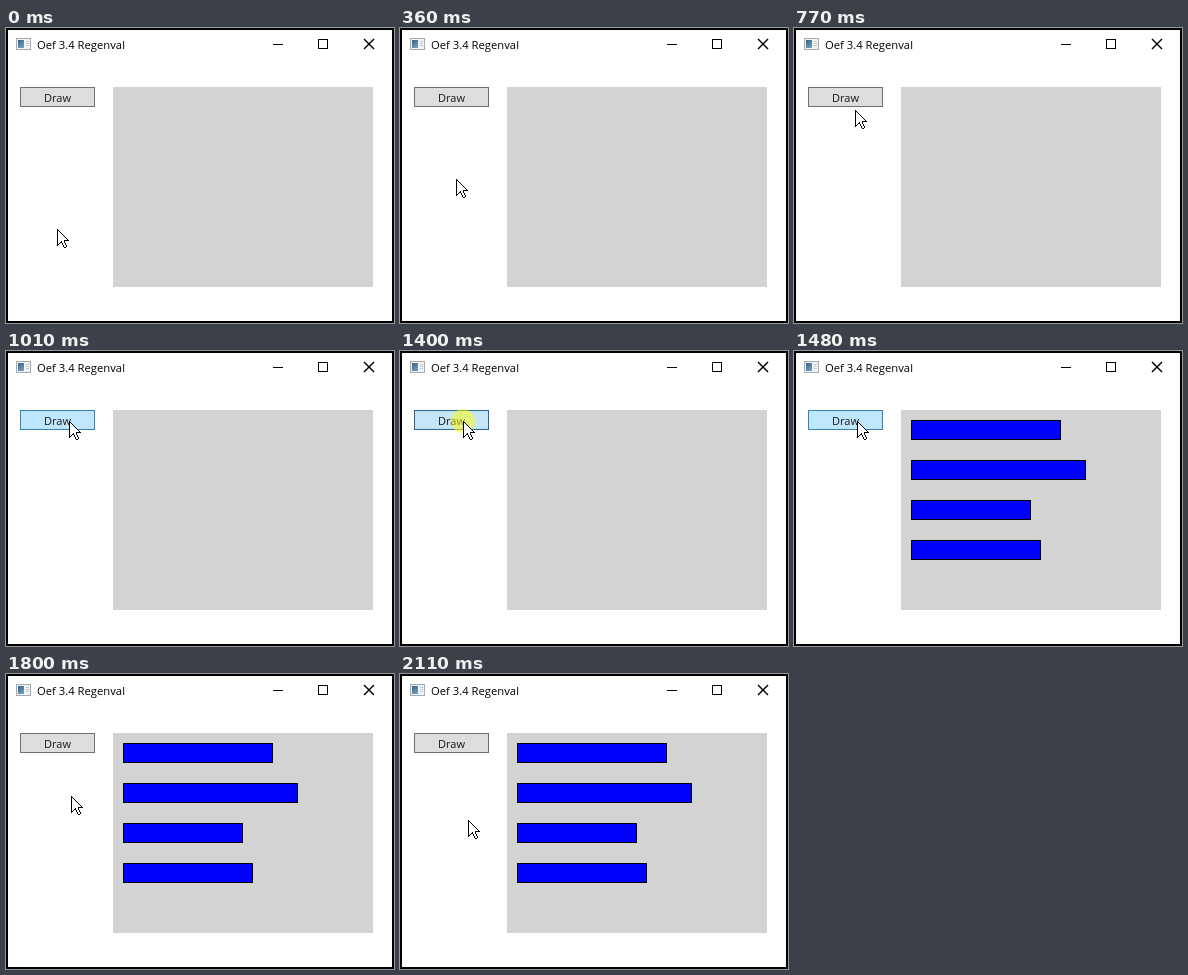
Write an HTML page with a canvas that moves like this. It is 388 px wide and 295 px high and loops after 3.71 s.

```html
<!DOCTYPE html>
<html lang="nl">
<head>
<meta charset="utf-8">
<title>Regenval</title>
<style>
html, body { margin: 0; width: 100%; height: 100%; overflow: hidden; background: #fff; }
canvas { display: block; }
</style>
</head>
<body>
<canvas id="stage" width="388" height="295"></canvas>
<script>
const ctx = document.getElementById('stage').getContext('2d');
const LOOP = 3710, PRESS = 1400, RELEASE = 1480, LEAVE = 1645;
const FONT = '"Open Sans", "Noto Sans", sans-serif';
const BARS = [150, 175, 120, 130];

function rect(x, y, w, h, fill) {
  ctx.fillStyle = fill;
  ctx.fillRect(x, y, w, h);
}

function box(x, y, w, h, fill, border, edge = 1) {
  rect(x, y, w, h, border);
  rect(x + edge, y + edge, w - 2 * edge, h - 2 * edge, fill);
}

function text(str, x, y, size, color) {
  ctx.font = `${size}px ${FONT}`;
  ctx.fillStyle = color;
  ctx.fillText(str, x, y);
}

function line(x1, y1, x2, y2) {
  ctx.beginPath();
  ctx.moveTo(x1, y1);
  ctx.lineTo(x2, y2);
  ctx.stroke();
}

function drawIcon() {
  box(10, 10, 15, 12, '#f1f4f6', '#a3abb1');
  const blue = ctx.createLinearGradient(12, 12, 18, 20);
  blue.addColorStop(0, '#3a6286');
  blue.addColorStop(1, '#78a5bf');
  rect(12, 12, 6, 8, blue);
  for (let y = 13; y < 19; y += 2) rect(20, y, 3, 1, '#c3c9ce');
}

function drawWindow() {
  box(0, 0, 388, 295, '#fff', '#000', 2);
  drawIcon();
  text('Oef 3.4 Regenval', 31, 21, 11.25, '#000');
  rect(267, 16, 10, 1, '#000');
  box(312, 11, 10, 10, '#fff', '#000');
  ctx.strokeStyle = '#000';
  ctx.lineWidth = 1.4;
  line(358, 11, 368, 21);
  line(368, 11, 358, 21);
  rect(107, 59, 260, 200, '#d3d3d3');
}

function drawButton(fill, border) {
  box(14, 59, 75, 20, fill, border);
  text('Draw', 38, 74, 11, '#1c1c1c');
}

// Classic arrow, built from outlined pixel rows
function drawPointer(x, y) {
  const span = (row, from, to) => {
    rect(x + from, y + row, to - from + 1, 1, '#000');
    if (to - from > 1) rect(x + from + 1, y + row, to - from - 1, 1, '#fff');
  };
  for (let row = 0; row < 12; row++) span(row, 0, row);
  rect(x + 7, y + 11, 5, 1, '#000');
  for (let row = 12; row < 17; row++) span(row, 0, 16 - row);
  for (let row = 12; row < 18; row++) {
    const left = 4 + ((row - 12) >> 1);
    span(row, left, left + 3);
  }
  rect(x + 7, y + 18, 2, 1, '#000');
}

const ease = (p, rise, settle) => 1 - (1 - p ** rise) ** settle;
const mix = (a, b, p) => Math.round(a + (b - a) * p);

// Share of a stepped move that is done
function progress(t, start, step, count) {
  const done = Math.floor((t - start) / step) + 1;
  return Math.min(Math.max(done / count, 0), 1);
}

function pointerAt(t) {
  if (t < LEAVE) {
    const p = progress(t, 200, 80, 11);
    return [mix(51, 63, ease(p, 1, 1.5)), mix(201, 70, ease(p, 1.22, 2.09))];
  }
  const p = progress(t, LEAVE, 77, 7);
  return [mix(63, 68, p), mix(70, 146, ease(p, 1, 2.06))];
}

function draw(t) {
  const [x, y] = pointerAt(t);
  const pressed = t >= PRESS && t < RELEASE;

  drawWindow();
  if (pressed) drawButton('#c4e5f6', '#2c628b');
  else if (y < 79) drawButton('#bee6fd', '#3c7fb1');
  else drawButton('#ddd', '#707070');

  if (t >= RELEASE) BARS.forEach((w, i) => box(117, 69 + 40 * i, w, 20, '#00f', '#000'));

  if (pressed) {
    ctx.beginPath();
    ctx.arc(63, 70, 12, 0, Math.PI * 2);
    ctx.fillStyle = 'rgba(255, 255, 0, 0.5)';
    ctx.fill();
  }
  drawPointer(x, y);
}

const start = performance.now();
function tick() {
  draw((performance.now() - start) % LOOP);
  requestAnimationFrame(tick);
}
tick();
</script>
</body>
</html>
```
